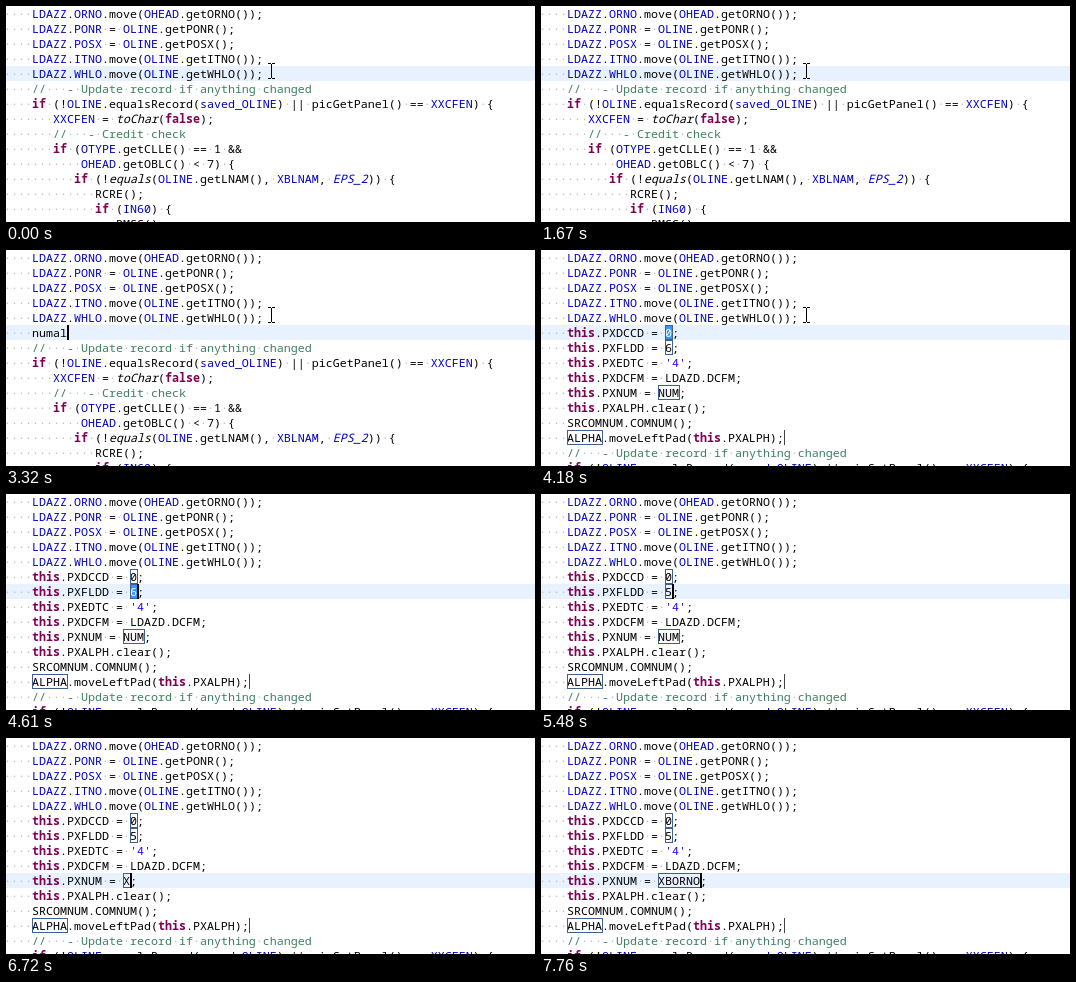
An HTML page that plays this animation: 529 px wide and 216 px high, repeating every 8000 ms.

```html
<!DOCTYPE html>
<html lang="en">
<head>
<meta charset="utf-8">
<title>Code template</title>
<style>
html, body { margin: 0; width: 100%; height: 100%; overflow: hidden; background: #fff; }
#stage {
  position: relative; width: 529px; height: 216px; overflow: hidden; background: #fff;
  font: 11.667px/15px "Noto Sans Mono", "DejaVu Sans Mono", monospace; color: #000;
  font-variant-ligatures: none;
}
#stage div { position: absolute; height: 15px; white-space: pre; box-sizing: border-box; }
.current { background: #e8f2fe; }
.space { color: #b9b9b9; }
.comment { color: #3f7f5f; }
.string { color: #2a00ff; }
.keyword { color: #7f0055; font-weight: bold; }
.field { color: #0000c0; }
.constant { color: #0000c0; font-style: italic; }
.static { font-style: italic; }
.selection { background: #3399ff; color: #fff; }
.slot { border: 1px solid #3f5f8f; }
.exit { background: #444; }
.caret { background: #000; }
svg { position: absolute; left: 262px; top: 57px; }
</style>
</head>
<body>
<div id="stage"></div>
<script>
const LOOP = 8000, CHAR = 7, LINE = 15, LEFT = -2;
const stage = document.getElementById('stage');

const before = [
  'LDAZZ.ORNO.move(OHEAD.getORNO());',
  'LDAZZ.PONR = OLINE.getPONR();',
  'LDAZZ.POSX = OLINE.getPOSX();',
  'LDAZZ.ITNO.move(OLINE.getITNO());',
  'LDAZZ.WHLO.move(OLINE.getWHLO());'
];
const after = [
  '//   - Update record if anything changed',
  'if (!OLINE.equalsRecord(saved_OLINE) || picGetPanel() == XXCFEN) {',
  '   XXCFEN = toChar(false);',
  '   //   - Credit check',
  '   if (OTYPE.getCLLE() == 1 &&',
  '       OHEAD.getOBLC() < 7) {',
  '      if (!equals(OLINE.getLNAM(), XBLNAM, EPS_2)) {',
  '         RCRE();',
  '         if (IN60) {',
  '            RMSG();'
];
const snippet = ({ decimals, digits, number }) => [
  `this.PXDCCD = ${decimals};`,
  `this.PXFLDD = ${digits};`,
  "this.PXEDTC = '4';",
  'this.PXDCFM = LDAZD.DCFM;',
  `this.PXNUM = ${number};`,
  'this.PXALPH.clear();',
  'SRCOMNUM.COMNUM();',
  'ALPHA.moveLeftPad(this.PXALPH);'
];

// Each step changes only the named parts of the state.
const steps = [
  [0, { row: 4, col: 37, caret: false, beam: true, typed: null, expanded: false, slots: false,
        selected: '', decimals: '0', digits: '6', number: 'NUM' }],
  [1180, { caret: true }],
  [1670, { caret: false }],
  [1850, { typed: '', row: 5, col: 4, caret: true, beam: false }],
  [2410, { caret: false, beam: true }],
  [2530, { typed: 'n', col: 5, caret: true, beam: false }],
  [2650, { typed: 'nu', col: 6 }],
  [2830, { typed: 'num', col: 7 }],
  [2960, { typed: 'numa', col: 8 }],
  [3140, { typed: 'numal', col: 9 }],
  [3320, { beam: true }],
  [3570, { expanded: true, col: 19 }],
  [3690, { slots: true, selected: '0', col: 19 }],
  [4180, { caret: false }],
  [4610, { row: 6, selected: '6', caret: true, beam: false }],
  [5110, { caret: false, beam: true }],
  [5480, { digits: '5', selected: '', caret: true, beam: false }],
  [5660, { row: 9, col: 20, selected: 'NUM' }],
  [6210, { caret: false }],
  [6600, { beam: true }],
  [6720, { number: 'X', col: 18, selected: '', caret: true, beam: false }],
  [6970, { number: 'XB', col: 19 }],
  [7280, { number: 'XBO', col: 20 }],
  [7400, { number: 'XBOR', col: 21 }],
  [7580, { number: 'XBORN', col: 22 }],
  [7760, { number: 'XBORNO', col: 23 }]
];
let state = {};
const scenes = steps.map(([time, change]) => ({ time, ...(state = { ...state, ...change }) }));

const rules = [
  ['comment', /\/\/.*/],
  ['string', /'[^']*'/],
  ['keyword', /\b(?:if|this|false)\b/],
  ['constant', /\bEPS_2\b/],
  ['static', /\b(?:toChar|equals)\b/],
  ['field', /\b(?:LDAZZ|ORNO|PONR|POSX|ITNO|WHLO|OHEAD|OLINE|saved_OLINE|OTYPE|XXCFEN|XBLNAM|IN60)\b/],
  ['plain', /\w+|[^\w\s]|\s+/]
];
const lexer = new RegExp(rules.map(([name, rule]) => `(?<${name}>${rule.source})`).join('|'), 'g');

function addSpan(parent, kind, text) {
  const span = document.createElement('span');
  span.className = kind;
  span.textContent = text;
  parent.append(span);
}

function addBlock(kind, row, x, width, text = '') {
  const block = document.createElement('div');
  block.className = kind;
  block.style.cssText = `left:${x}px;top:${row * LINE}px;width:${width}px`;
  block.textContent = text;
  stage.append(block);
  return block;
}

const columnX = col => LEFT + col * CHAR;

function addLine(text, row) {
  const line = addBlock('line', row, LEFT, 700);
  for (const match of ('    ' + text).matchAll(lexer)) {
    const kind = Object.keys(match.groups).find(name => match.groups[name] !== undefined);
    for (const part of match[0].match(/ +|[^ ]+/g)) {
      if (part[0] === ' ') addSpan(line, 'space', '·'.repeat(part.length));
      else addSpan(line, kind, part);
    }
  }
}

function addBeam() {
  stage.insertAdjacentHTML('beforeend',
    '<svg width="7" height="16" shape-rendering="crispEdges">' +
    '<path d="M0 0h3v1h1v-1h3v1h-3v14h3v1h-3v-1h-1v1h-3v-1h3v-14h-3z"/></svg>');
}

function draw(scene) {
  stage.replaceChildren();
  addBlock('current', scene.row, 0, 529);
  const inserted = scene.expanded ? snippet(scene) : scene.typed === null ? [] : [scene.typed];
  [...before, ...inserted, ...after].slice(0, 15).forEach(addLine);

  if (scene.selected) {
    const length = scene.selected.length;
    addBlock('selection', scene.row, columnX(scene.col - length), length * CHAR, scene.selected);
  }
  if (scene.slots) {
    const slots = [[5, 18, scene.decimals], [6, 18, scene.digits], [9, 17, scene.number], [12, 4, 'ALPHA']];
    for (const [row, col, text] of slots) addBlock('slot', row, columnX(col), text.length * CHAR + 1);
    addBlock('exit', 12, columnX(35), 1);
  }
  if (scene.caret) addBlock('caret', scene.row, columnX(scene.col), 2);
  if (scene.beam) addBeam();
}

let shown = null;
function tick() {
  const time = performance.now() % LOOP;
  const scene = scenes.findLast(item => item.time <= time);
  if (scene !== shown) draw(shown = scene);
  requestAnimationFrame(tick);
}
tick();
</script>
</body>
</html>
```
